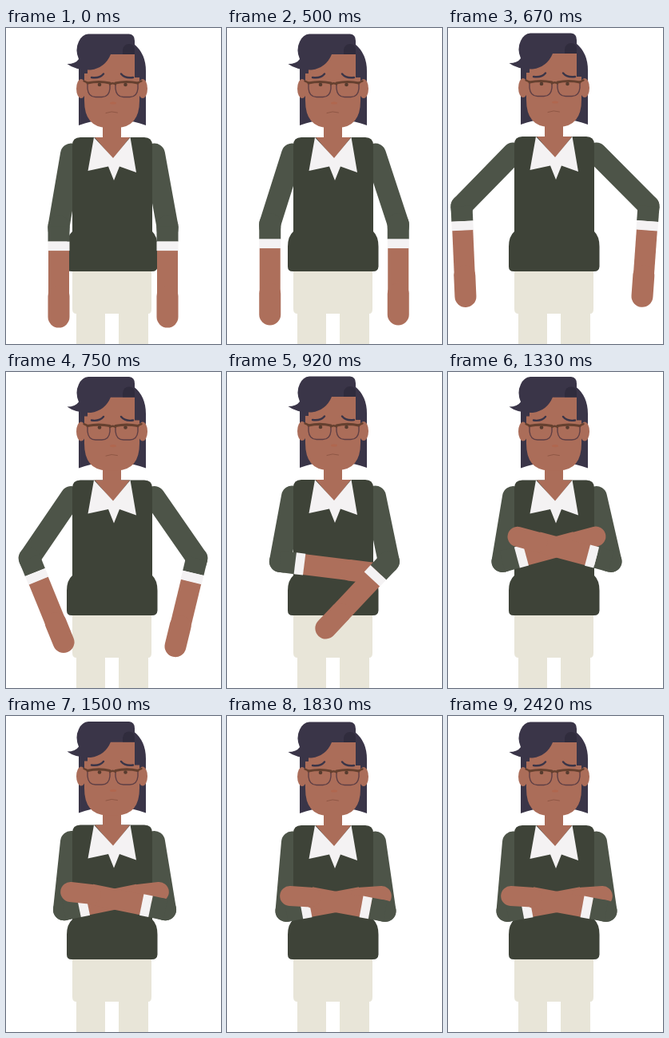
An HTML page with a canvas for the animation above (2510 ms loop, 269 by 396 pixels).

```html
<!DOCTYPE html>
<html lang="en">
<head>
<meta charset="utf-8">
<title>Crossing arms</title>
<style>
html, body { margin: 0; width: 100%; height: 100%; overflow: hidden; background: #fff; }
canvas { display: block; width: 269px; height: 396px; }
</style>
</head>
<body>
<canvas id="stage" width="269" height="396"></canvas>
<script>
const ctx = document.getElementById('stage').getContext('2d');
const LOOP = 2510, ARM = 27, HAND = 26, SHOULDER_Y = 158;
const C = {
  skin: '#ab6d59', arm: '#ad6f5b', hair: '#3a3548', lump: '#302c3d',
  vest: '#3e4338', sleeve: '#4d5448', white: '#f4f2f3', pants: '#e8e5d8',
  frame: '#65402f', lens: '#5e3f45', eye: '#573c2f', nose: '#b0674f', mouth: '#8f5745'
};

const clamp = u => Math.min(1, Math.max(0, u));
const ramp = (k, from, to) => clamp((k - from) / (to - from));
const smooth = (k, from, to) => {
  const u = ramp(k, from, to);
  return u * u * (3 - 2 * u);
};

// Elbows swing out and back, the forearms fold in one after the other, then all settles.
function poseAt(k) {
  const swing = Math.sin(Math.PI * ramp(k, 5, 11)) ** 2;
  const fold = smooth(k, 9, 16), settle = smooth(k, 16, 19);
  const lift = 2.2 * Math.sin(Math.PI * ramp(k, 6, 19));
  const spread = 68 + 49 * swing - 6 * settle;
  const upper = 92 - 11 * smooth(k, 9, 11) + 6 * settle;
  const ey = SHOULDER_Y + Math.sqrt(upper ** 2 - (spread - 52) ** 2);
  const arm = (side, from, to) => ({
    side, ey,
    sx: 133.5 - side * 52,
    ex: 134 + 2 * fold - side * spread,
    angle: 105 * smooth(k, from, to) - 4.5 * settle,
    bend: 7 * settle,
    length: 113.5 + 7.5 * fold,
    hand: ARM - 2 * fold
  });
  return { lift, arms: [arm(1, 7.55, 12.45), arm(-1, 6.9, 16.2)] };
}

function fill(d, color) {
  ctx.fillStyle = color;
  ctx.fill(new Path2D(d));
}

function stroke(d, color, width, cap = 'round') {
  ctx.strokeStyle = color;
  ctx.lineWidth = width;
  ctx.lineCap = cap;
  ctx.lineJoin = 'round';
  ctx.stroke(new Path2D(d));
}

function disc(x, y, rx, ry, color) {
  ctx.fillStyle = color;
  ctx.beginPath();
  ctx.ellipse(x, y, rx, ry, 0, 0, Math.PI * 2);
  ctx.fill();
}

function upperArm({ sx, ex, ey }, lift) {
  stroke(`M${sx} ${SHOULDER_Y - lift}L${ex} ${ey}`, C.sleeve, ARM);
}

function forearm({ ex, ey, angle, bend, length, side, hand }) {
  const rad = Math.PI / 180;
  const point = (x, y, deg, d) => [x + side * Math.sin(deg * rad) * d, y + Math.cos(deg * rad) * d];
  const at = d => point(ex, ey, angle, d).join(' ');
  const wrist = point(ex, ey, angle, length - HAND);
  const tip = point(...wrist, angle - bend, HAND);
  stroke(`M${at(30)}L${wrist.join(' ')}`, C.arm, ARM - 1, 'butt');
  stroke(`M${wrist.join(' ')}L${tip.join(' ')}`, C.arm, hand);
  stroke(`M${at(0)}L${at(4)}`, C.sleeve, ARM);
  stroke(`M${at(0)}L${at(19)}`, C.sleeve, ARM, 'butt');
  stroke(`M${at(19)}L${at(30.5)}`, C.white, ARM, 'butt');
}

function legs() {
  fill('M83 300H182V352Q182 358 178 358V396H141V358H124V396H88V358Q83 358 83 352Z', C.pants);
}

function vest(lift) {
  const top = 137 - lift;
  fill(`M93 ${top}H173Q183 ${top} 183 ${top + 10}V255Q189.5 261 189.5 274V299
    Q189 305 183 305H82Q76 305 76 299V274Q76 261 83 255V${top + 10}Q83 ${top} 93 ${top}Z`, C.vest);
}

function head() {
  // back hair with the rounded right side
  fill('M91 45H130V20H160Q175 32 175 54V122Q160 116 145 116H121Q106 116 91 122Z', C.hair);
  fill('M121 110H144V137H155L134 164L111 137H121Z', C.skin);

  // ears and face
  for (const x of [94, 171]) disc(x, 76, 6, 12, C.skin);
  fill('M102 33H161V62H167V91Q167 124 139 125H126Q98 124 98 91V57H102Z', C.skin);

  // quiff
  fill(`M103 7.5H154Q161 8 161 16V33H131Q124 50 106 52.5Q87 53 76.5 45
    Q87 45 91 39Q86 27 91 17Q95 8 103 7.5Z`, C.hair);
  fill('M161 33H146V28Q147 20 154 20Q161 20 161 27Z', C.lump);

  // brows and eyes
  stroke('M107 62Q117 63.5 122 57.5', C.hair, 2.4);
  stroke('M159 62Q149 63.5 144 57.5', C.hair, 2.4);
  for (const x of [117, 149.5]) disc(x, 71, 2.3, 2.3, C.eye);

  // glasses
  for (const x of [102, 137]) {
    stroke(`M${x} 70V76Q${x + 1} 86.5 ${x + 10} 86.5H${x + 18}Q${x + 27} 86.5 ${x + 28} 76V70`, C.lens, 1.4);
    stroke(`M${x} 69Q${x + 14} 66 ${x + 28} 69`, C.frame, 3.2);
  }
  stroke('M130 70.5Q133.5 68 137 70.5M97.5 66.5L103 69M169.5 66.5L164 69', C.frame, 2.4);

  disc(134, 94, 4, 1.6, C.nose);
  stroke('M125 106.5Q132 103.5 139.5 106', C.mouth, 1);
}

function collar() {
  fill('M110 137L134 163L155.5 137L163 181L142 173.5L135 191L128 173.5L102.5 179Z', C.white);
}

function draw(step) {
  const { lift, arms } = poseAt(step);
  ctx.fillStyle = '#fff';
  ctx.fillRect(0, 0, 269, 396);
  legs();
  arms.forEach(a => upperArm(a, lift));
  vest(lift);
  ctx.save();
  ctx.translate(0, -lift);
  head();
  collar();
  ctx.restore();
  arms.forEach(forearm);
}

// Twelve poses a second, each start rounded to 10 ms.
const startOf = step => Math.round(step * 25 / 3) * 10;
let begin = null;

function tick(now) {
  if (begin === null) begin = now;
  const t = (now - begin) % LOOP;
  let step = 0;
  while (step < 29 && startOf(step + 1) <= t) step++;
  draw(step);
  requestAnimationFrame(tick);
}

draw(0);
requestAnimationFrame(tick);
</script>
</body>
</html>
```
